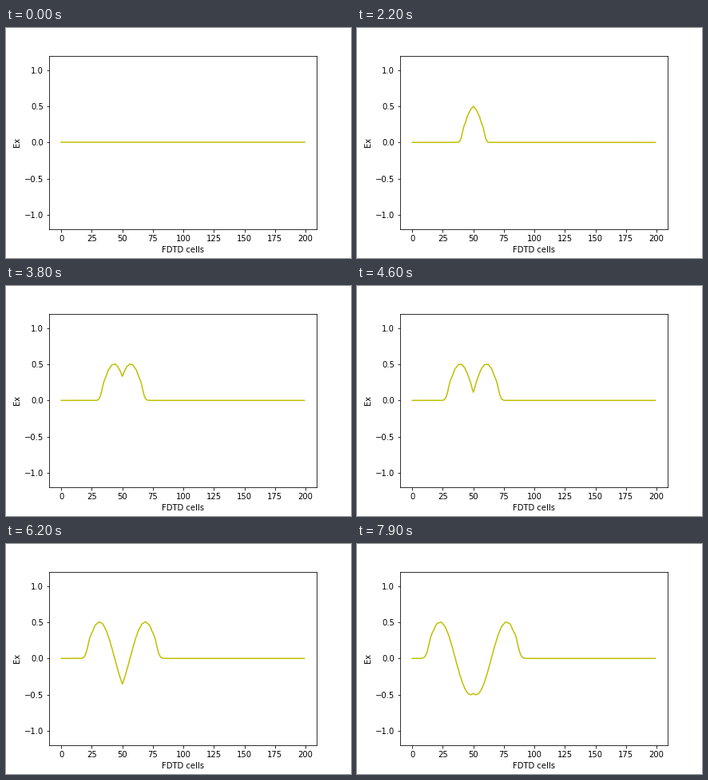
Write a matplotlib script that moves like this. It is 432x288 px and loops after 8 s.

```python
import numpy as np
import matplotlib.pyplot as plt
from matplotlib.animation import FuncAnimation

CELLS = 200
STEPS = 80
SOURCE = 50
PERIOD = 100      # time steps per source cycle
AMPLITUDE = 0.5
COURANT = 0.5


def simulate():
    """Return Ex after every time step of a 1D FDTD run."""
    ex = np.zeros(CELLS)
    hy = np.zeros(CELLS)
    history = []
    for n in range(STEPS):
        ex[1:] += COURANT * (hy[:-1] - hy[1:])
        ex[SOURCE] += AMPLITUDE * np.sin(2 * np.pi * n / PERIOD)
        hy[:-1] += COURANT * (ex[:-1] - ex[1:])
        history.append(ex.copy())
    return history


fields = simulate()

fig, ax = plt.subplots(figsize=(6, 4), dpi=72, facecolor="white")
fig.subplots_adjust(left=0.125, right=0.9, bottom=0.125, top=0.88)
line, = ax.plot(np.arange(CELLS), fields[0], color="y", lw=1.5)
ax.set_ylim(-1.2, 1.2)
ax.set_xlabel("FDTD cells")
ax.set_ylabel("Ex")


def update(n):
    line.set_ydata(fields[n])
    return line,


anim = FuncAnimation(fig, update, frames=STEPS, interval=100,
                     repeat=True, repeat_delay=0)
plt.show()
```
